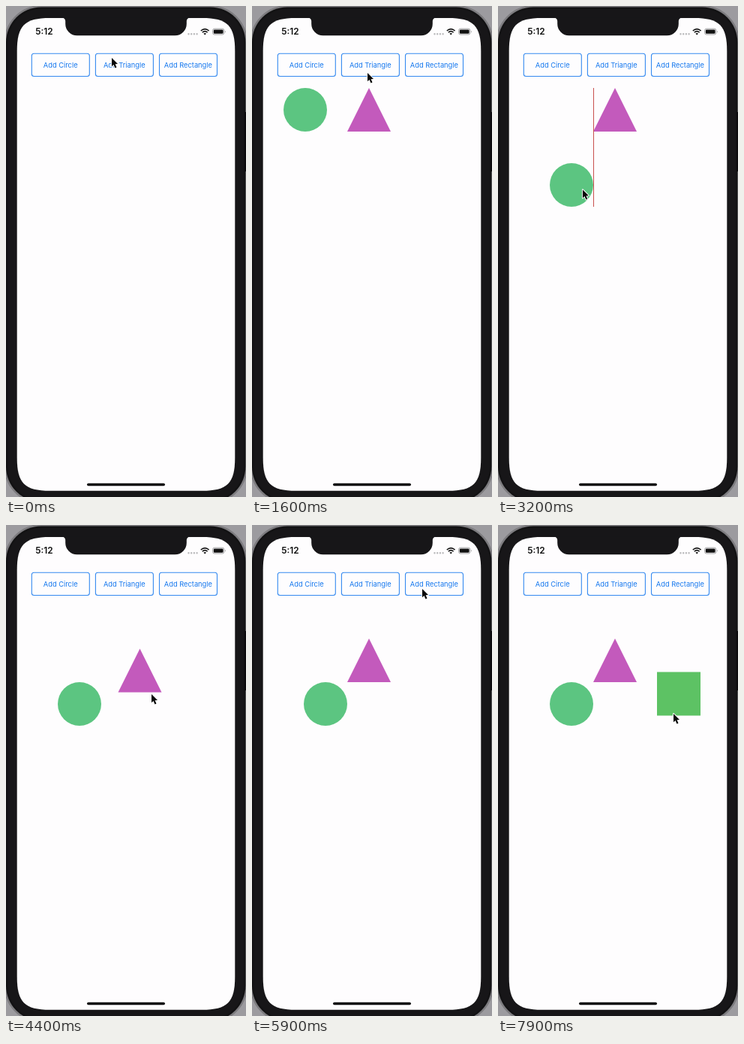
These frames come from a looping animation (320x653 px, 8 s). An HTML page with a canvas:

```html
<!DOCTYPE html>
<html lang="en">
<head>
<meta charset="utf-8">
<title>Shape alignment guides</title>
<style>
html, body { margin: 0; width: 100%; height: 100%; overflow: hidden; background: #9c9b9f; }
svg, canvas { position: absolute; left: 0; top: 0; width: 320px; height: 653px; display: block; }
text { font-family: Inter, Roboto, sans-serif; text-anchor: middle; }
.label { font-size: 9.3px; fill: #1678ee; }
.button { fill: none; stroke: #358af0; stroke-width: 1.1; }
</style>
</head>
<body>
<svg viewBox="0 0 320 653">
  <rect width="320" height="653" fill="#9c9b9f"/>
  <rect x="0" y="1.5" width="319.4" height="658" rx="47" fill="#171618" stroke="#000" stroke-opacity=".2" stroke-width="5"/>
  <rect x="318" y="141" width="2" height="79" fill="#0c0b0d"/>
  <path d="M14.7 60 C14.7 26 24.7 16 58.7 16 H261.3 C295.3 16 305.3 26 305.3 60 V600.7
    C305.3 634.7 295.3 644.7 261.3 644.7 H58.7 C24.7 644.7 14.7 634.7 14.7 600.7 Z" fill="#fefdfe"/>
  <path d="M74.6 15.5 A4.6 4.6 0 0 1 79.2 20.3 V23.7 A15.5 15.5 0 0 0 94.7 39.2 H225.3
    A15.5 15.5 0 0 0 240.8 23.7 V20.3 A4.6 4.6 0 0 1 245.4 15.5 Z" fill="#171618"/>
  <text x="51" y="38.2" font-size="11.8" font-weight="600" fill="#111">5:12</text>
  <path d="M243.5 37.3 h12" stroke="#b9b9bb" stroke-width="2.4" stroke-linecap="round" stroke-dasharray="0 3.7"/>
  <g fill="none" stroke="#111" stroke-width="1.6">
    <path d="M259.8 33 Q265.2 28.2 270.6 33"/>
    <path d="M261.8 35.2 Q265.2 32.2 268.6 35.2"/>
  </g>
  <path d="M263.4 36.7 Q265.2 35.2 267 36.7 L265.2 38.6 Z" fill="#111"/>
  <rect x="275.6" y="30.2" width="15.2" height="7.8" rx="2.3" fill="none" stroke="#8b8b8d" stroke-width=".8"/>
  <rect x="276.8" y="31.4" width="12.8" height="5.4" rx="1.3" fill="#111"/>
  <path d="M292 32.7 Q293.6 34.1 292 35.5 Z" fill="#8b8b8d"/>
  <g id="buttons"></g>
  <rect x="108" y="634.7" width="104" height="3.6" rx="1.8" fill="#0b0b0c"/>
</svg>
<canvas id="stage"></canvas>
<script>
const LOOP = 8000, STEP = 100, HALF = 29, SNAP = 4;
const canvas = document.getElementById('stage');
const ctx = canvas.getContext('2d');
const scale = window.devicePixelRatio || 1;
canvas.width = 320 * scale;
canvas.height = 653 * scale;
ctx.scale(scale, scale);

document.getElementById('buttons').innerHTML = ['Circle', 'Triangle', 'Rectangle'].map((name, i) => {
  const x = 34.3 + 85.1 * i;
  return `<rect class="button" x="${x}" y="63.3" width="77" height="30.2" rx="3"/>
    <text class="label" x="${x + 38.4}" y="81.8">Add ${name}</text>`;
}).join('');

// A leg visits its points at even time steps; grip is the cursor's hold on a dragged shape.
const shapes = [
  { kind: 'circle', color: '#5cc581', born: 900, start: 1850, step: 325, grip: [11.5, 8],
    points: [[71, 138], [53, 192], [56, 245], [82, 238], [100, 238]] },
  { kind: 'triangle', color: '#c35abc', born: 1400, start: 3700, step: 350, grip: [15.5, 31.5],
    points: [[156, 138], [176, 172], [178.5, 193.5], [158, 181], [156, 180]] },
  { kind: 'square', color: '#5dc264', born: 6100, start: 6600, step: 350, grip: [-7, 26.5],
    points: [[241, 138], [241, 208], [241, 138], [241, 224.5]] }
];
const tour = { start: 0, step: 320,
  points: [[141, 69], [248, 77], [31, 80], [74, 90], [152, 90], [154, 89]] };
const detour = { start: 5400, step: 475, points: [[79, 241], [227, 85], [227, 88]] };

const timed = ({ start, step, points, grip = [0, 0] }) =>
  points.map(([x, y], i) => ({ t: start + i * step, x: x + grip[0], y: y + grip[1] }));
const cursorPath = [tour, ...shapes, detour].flatMap(timed).sort((a, b) => a.t - b.t);
for (const s of shapes) {
  s.path = timed({ ...s, grip: undefined });
  s.end = s.path[s.path.length - 1].t + 200;
}

function along(path, t) {
  const next = path.findIndex(k => k.t > t);
  if (next <= 0) {
    const { x, y } = path[next ? path.length - 1 : 0];
    return { x, y };
  }
  const a = path[next - 1], b = path[next];
  const u = (t - a.t) / (b.t - a.t), e = u * u * (3 - 2 * u);
  return { x: a.x + (b.x - a.x) * e, y: a.y + (b.y - a.y) * e };
}

// Aligns one axis to the newest neighbour with a close edge; returns the guides.
function snapAxis(pos, others, axis) {
  for (const other of others) {
    for (const gap of [0, 2 * HALF, -2 * HALF]) {
      const goal = other[axis] + gap;
      if (Math.abs(pos[axis] - goal) >= SNAP) continue;
      pos[axis] = goal;
      const edges = gap ? [goal - gap / 2] : [goal - HALF, goal + HALF];
      return edges.map(at => ({ axis, at, other }));
    }
  }
  return [];
}

// Places every shape present at t, the held one snapped against the rest.
function layout(t) {
  const live = [];
  let guides = [], held = null;
  for (const s of shapes.filter(s => t >= s.born)) {
    live.push({ ...s, pos: along(s.path, t) });
  }
  for (const s of live.filter(s => t >= s.start)) {
    const others = live.filter(o => o !== s && o.born < s.start).reverse();
    const anchors = others.map(o => o.start > s.start ? o.path[0] : o.pos);
    const lines = ['x', 'y'].flatMap(axis => snapAxis(s.pos, anchors, axis));
    if (t < s.end) {
      guides = lines;
      held = s;
    }
  }
  return { live, guides, held };
}

function drawShape({ kind, color, pos: { x, y } }) {
  ctx.fillStyle = color;
  ctx.beginPath();
  if (kind === 'circle') {
    ctx.arc(x, y, HALF, 0, Math.PI * 2);
  } else if (kind === 'triangle') {
    ctx.moveTo(x, y - HALF);
    ctx.lineTo(x + HALF, y + HALF);
    ctx.lineTo(x - HALF, y + HALF);
  } else {
    ctx.rect(x - HALF, y - HALF, 2 * HALF, 2 * HALF);
  }
  ctx.fill();
}

function drawGuide({ axis, at, other }, pos) {
  const cross = axis === 'x' ? 'y' : 'x';
  const from = Math.min(pos[cross], other[cross]) - HALF;
  const length = Math.abs(pos[cross] - other[cross]) + 2 * HALF;
  ctx.fillStyle = '#c9504f';
  if (axis === 'x') ctx.fillRect(at, from, 1, length);
  else ctx.fillRect(from, at, length, 1);
}

const arrow = new Path2D('M0 0 V11.2 L2.5 8.9 L4.5 13.4 L6.5 12.5 L4.6 8.2 L8 8 Z');

function drawCursor({ x, y }) {
  ctx.save();
  ctx.translate(x, y);
  ctx.lineJoin = 'round';
  ctx.lineWidth = 1.8;
  ctx.strokeStyle = '#fff';
  ctx.stroke(arrow);
  ctx.fillStyle = '#080808';
  ctx.fill(arrow);
  ctx.restore();
}

function draw(t) {
  ctx.clearRect(0, 0, 320, 653);
  const { live, guides, held } = layout(t);
  live.forEach(drawShape);
  guides.forEach(g => drawGuide(g, held.pos));
  drawCursor(along(cursorPath, t));
}

const start = performance.now();
function tick(now) {
  const t = Math.max(0, now - start) % LOOP;
  draw(Math.floor(t / STEP) * STEP);
  requestAnimationFrame(tick);
}
draw(0);
requestAnimationFrame(tick);
</script>
</body>
</html>
```
